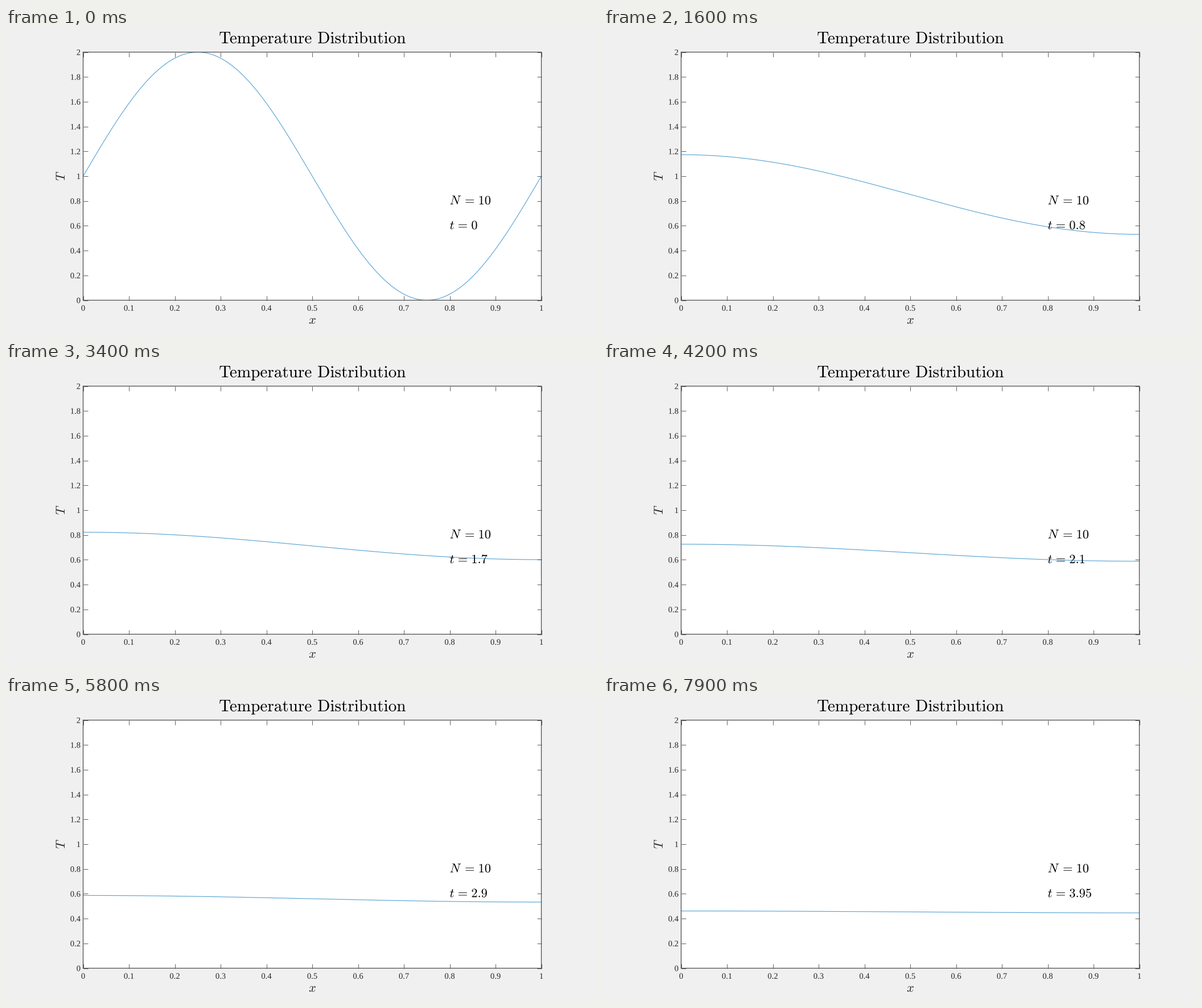
A matplotlib script that plays this animation: 1040x539 px, repeating every 8000 ms.

```python
import numpy as np
import matplotlib.pyplot as plt
from matplotlib.animation import FuncAnimation
from matplotlib.patches import PathPatch
from matplotlib.textpath import TextPath
from matplotlib.transforms import Affine2D

W, H, DPI = 1040, 539, 64
PT = 72 / DPI                       # points per pixel
FRAMES, STEP_MS, DT = 80, 100, 0.05
LEFT, RIGHT, TOP, BOTTOM = 135.5, 940.5, 42.5, 479.5
INK, FRAME, BLUE = "#262626", "#505050", "#0072BD"
TICK, LABEL, TITLE = 14.6, 22.3, 29.2   # font sizes in pixels
ALPHA, LOSS, N = 0.1, 0.2, 10

plt.rcParams["mathtext.fontset"] = "cm"
fig = plt.figure(figsize=(W / DPI, H / DPI), dpi=DPI, facecolor="#f0f0f0")
ax = fig.add_axes([LEFT / W, 1 - BOTTOM / H,
                   (RIGHT - LEFT) / W, (BOTTOM - TOP) / H])
ax.set(xlim=(0, 1), ylim=(0, 2), facecolor="white",
       xticks=np.arange(11) / 10, yticks=np.arange(11) / 5)
ax.tick_params(direction="in", length=8 * PT, width=0.9 * PT, color=FRAME,
               top=True, right=True, labelbottom=False, labelleft=False)
for spine in ax.spines.values():
    spine.set(linewidth=1.3 * PT, color=FRAME, snap=False)

# Text is drawn as outlines on a layer measured in pixels
layer = fig.add_axes([0, 0, 1, 1], zorder=5)
layer.set(xlim=(0, W), ylim=(0, H))
layer.axis("off")


def outline(s, size):
    return TextPath((0, 0), s, size=size, prop={"family": "Liberation Serif"})


def put(x, y, s, size, color="black", center=False, angle=0):
    """Draw s with its baseline starting (or its ink centred) at x, y."""
    path = outline(s, size)
    box = path.get_extents()
    shift = -(box.x0 + box.x1) / 2 if center else 0
    place = Affine2D().translate(shift, 0).rotate_deg(angle)
    place.translate(x, H - y)
    return layer.add_patch(PathPatch(path, fc=color, lw=0,
                                     transform=place + layer.transData))


def rm(s):
    return r"$\mathrm{%s}$" % s


def equation(y, name, width, value):
    """Place 'name = value' with TeX spacing; widths are in em."""
    x, gap, pad = 779.5, 0.278, 0.176   # pad: mathtext's own space before '='
    put(x, y, f"${name}$", LABEL)
    put(x + (width + gap - pad) * LABEL, y, "$=$", LABEL)
    return put(x + (width + 2 * gap + 0.778) * LABEL, y, rm(value), LABEL)


def tick_label(x, y, value, align):
    s = f"{value:g}"
    width = TICK * (0.5 * len(s) - 0.25 * ("." in s))
    put(x - align * width, y, s, TICK, INK)


for k in range(11):
    tick_label(LEFT + (RIGHT - LEFT) * k / 10, 498, k / 10, 0.5)
    tick_label(131, BOTTOM + (TOP - BOTTOM) * k / 10 + 5, k / 5, 1)

for em, part in ((0, "T"), (0.639, "emperature"), (5.922, "Distribution")):
    put(374.2 + em * TITLE, 27, rm(part), TITLE)
put(538.3, 521, "$x$", LABEL, INK, center=True)
put(103, 261, "$T$", LABEL, INK, center=True, angle=90)
equation(310.7, "N", 0.912, str(N))
clock = equation(354.4, "t", 0.361, "0")


def start(x):
    return 1 + np.sin(2 * np.pi * x)


# Cosine modes of the insulated rod, sampled at N inner nodes plus both ends
nodes = np.linspace(0, 1, N + 2)
weights = np.full(N + 2, 2 / (N + 1))
weights[[0, -1]] /= 2
modes = np.pi * np.arange(N + 1)
coefs = np.cos(np.outer(modes, nodes)) @ (weights * start(nodes))
coefs[0] /= 2

xs = np.linspace(0, 1, 201)
shapes = np.cos(np.outer(xs, modes))
curve, = ax.plot(xs, start(xs), color=BLUE, alpha=0.65, lw=1.15 * PT,
                 clip_on=False)


def temperature(t):
    if t == 0:
        return start(xs)
    return shapes @ (coefs * np.exp(-(ALPHA * modes ** 2 + LOSS) * t))


def update(i):
    t = i * DT
    curve.set_ydata(temperature(t))
    clock.set_path(outline(rm(f"{t:.4g}"), LABEL))
    return curve, clock


anim = FuncAnimation(fig, update, frames=FRAMES, interval=STEP_MS,
                     repeat=True, repeat_delay=0)
plt.show()
```
